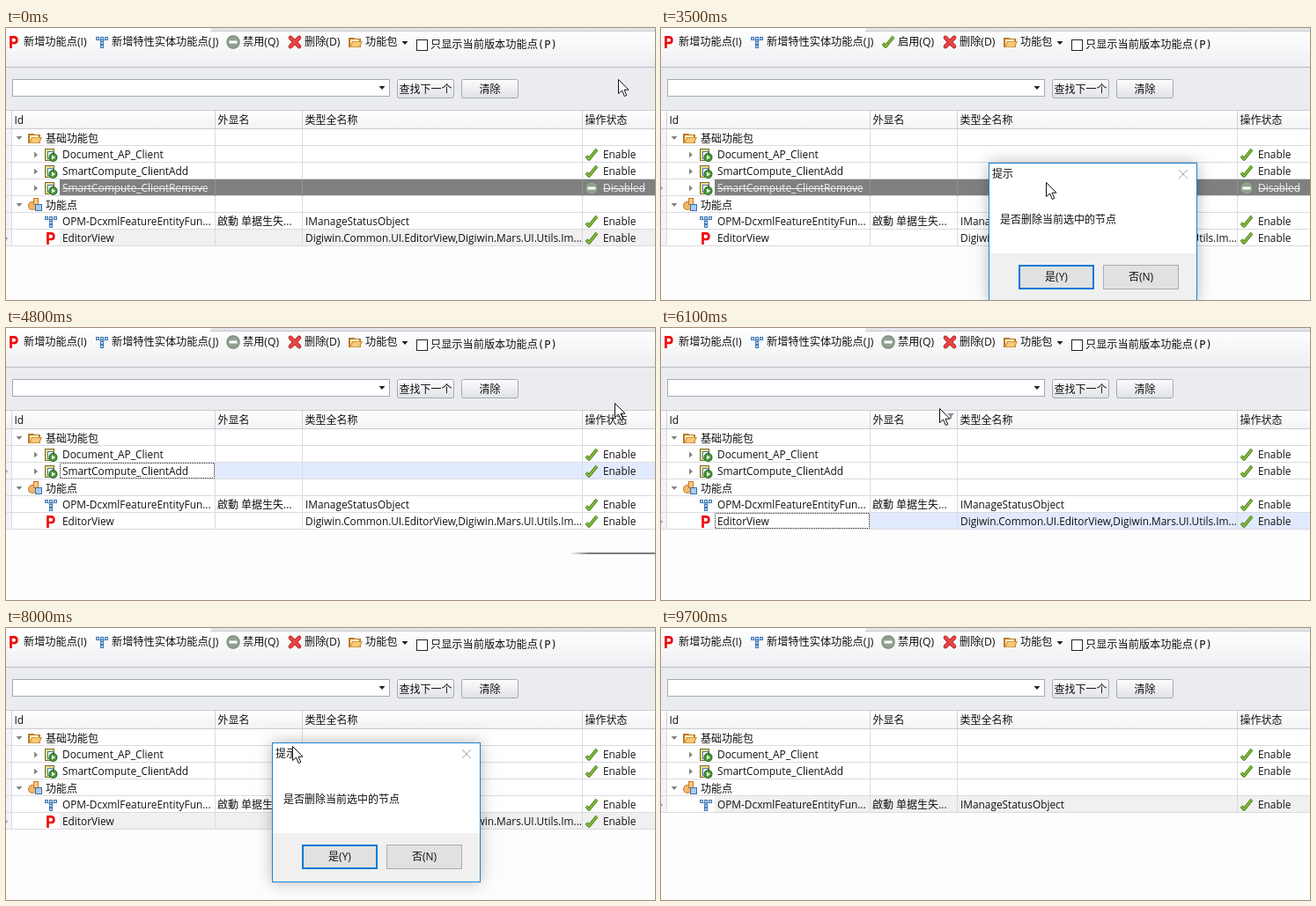
An HTML page with a canvas that plays this animation: 737 px wide and 309 px high, repeating every 9800 ms.

```html
<!DOCTYPE html>
<html lang="zh">
<head>
<meta charset="utf-8">
<style>
html, body { margin: 0; width: 100%; height: 100%; overflow: hidden; background: #fdfdfd; }
canvas { display: block; }
</style>
</head>
<body>
<canvas id="stage" width="737" height="309"></canvas>
<script>
const ctx = document.getElementById('stage').getContext('2d');
const W = 737, H = 309, LOOP = 9800, STEP = 100;
const ROW_TOP = 115, ROW_H = 19, CELL_X = 61;
const UI = '"Open Sans", "Noto Sans CJK SC", "Noto Sans CJK", sans-serif';
const CJK = '12px ' + UI;
const TOOL = '12.2px ' + UI;
const LATIN = '11.85px ' + UI;
const MONO = '12.2px "DejaVu Sans Mono", "Noto Sans CJK SC", "Noto Sans CJK", monospace';
const INK = '#111', LINE = '#dadbde', EDGE = '#a5a9b1';

// Motion: things rest at a stop, then ease out towards the next one.
const at = (x, y) => ({ x, y });
const shift = (a, b) => at(a.x + b.x, a.y + b.y);
const stop = (place, arrive, leave = arrive) => ({ place, arrive, leave });
const clamp = v => Math.max(0, Math.min(1, v));
const easeOut = u => 1 - (1 - u) ** 2;

function travel(stops, t) {
  const next = stops.findIndex(s => s.arrive > t);
  if (next === 0) return stops[0].place;
  if (next < 0) return stops[stops.length - 1].place;
  const a = stops[next - 1], b = stops[next];
  const p = easeOut(clamp((t - a.leave) / (b.arrive - a.leave)));
  const mix = key => Math.round(a.place[key] + (b.place[key] - a.place[key]) * p);
  return at(mix('x'), mix('y'));
}

const HOME = at(616, 298);
const DELETE_SPOT = at(336, 15);
const rowSpot = (x, index) => at(x, ROW_TOP + ROW_H * index + 5);

function makeDialog(open, press, close, grab, stops) {
  const yes = shift(stops[stops.length - 1].place, at(77, 127));
  const drag = stops.map(s => ({ ...s, place: shift(s.place, grab) }));
  return { open, press, close, stops, drag, yes };
}

const first = makeDialog(1800, 4200, 4400, at(65, 23), [
  stop(HOME, 2700, 3100), stop(at(290, 105), 3900)
]);
const second = makeDialog(6500, 8600, 8700, at(23, 5), [
  stop(HOME, 6800), stop(at(499, 128), 7400, 7600), stop(at(302, 130), 8000), stop(at(223, 73), 8200)
]);
const dialogs = [first, second];

const cursorStops = [
  stop(at(695, 59), 0),
  stop(rowSpot(183, 3), 500, 800),
  stop(DELETE_SPOT, 1400, 1900),
  ...first.drag,
  stop(first.yes, 4100, 4400),
  stop(at(691, 86), 4800),
  stop(rowSpot(262, 5), 5300, 5800),
  stop(at(316, 92), 6100),
  stop(DELETE_SPOT, 6300, 6500),
  ...second.drag,
  stop(second.yes, 8500, 8700),
  stop(rowSpot(717, 6), 9200)
];

function rect(x, y, w, h, color) {
  ctx.fillStyle = color;
  ctx.fillRect(x, y, w, h);
}

function frame(x, y, w, h, color, line = 1) {
  ctx.strokeStyle = color;
  ctx.lineWidth = line;
  ctx.strokeRect(x + line / 2, y + line / 2, w - line, h - line);
}

function box(x, y, w, h, fill, edge, line) {
  rect(x, y, w, h, fill);
  frame(x, y, w, h, edge, line);
}

function text(s, x, y, color = INK, font = CJK, align = 'left') {
  ctx.font = font;
  ctx.textAlign = align;
  ctx.fillStyle = color;
  ctx.fillText(s, x, y + 4);
}

function gradient(y, h, top, bottom) {
  const g = ctx.createLinearGradient(0, y, 0, y + h);
  g.addColorStop(0, top);
  g.addColorStop(1, bottom);
  return g;
}

function stroke(path, color, width) {
  ctx.strokeStyle = color;
  ctx.lineWidth = width;
  ctx.stroke(new Path2D(path));
}

function fill(path, color) {
  ctx.fillStyle = color;
  ctx.fill(new Path2D(path));
}

function disc(x, y, r, color) {
  ctx.beginPath();
  ctx.arc(x, y, r, 0, Math.PI * 2);
  ctx.fillStyle = color;
  ctx.fill();
}

function placed(x, y, paint) {
  ctx.save();
  ctx.translate(x, y);
  paint();
  ctx.restore();
}

// Icons are drawn around their centre.
const icons = {
  letter() {
    stroke('M-3.5 7V-5.7H0C4.5 -5.7 4.5 1 0 1H-3', '#f00c0c', 2.7);
  },
  entity() {
    stroke('M-5 -4L0 0L5 -4M0 -4V5', '#5283b5', 1);
    const node = (x, y) => box(x, y, 4, 4, '#b9d8f3', '#3f78b5');
    for (const x of [-7, -2, 3]) node(x, -6);
    for (const y of [-1, 3]) node(-2, y);
  },
  disable() {
    disc(0, 0, 7.7, '#70806f');
    disc(0, 0, 6.8, '#91a18f');
    rect(-4.5, -1.5, 9, 3, '#fff');
  },
  remove() {
    ctx.lineCap = 'round';
    const cross = 'M-5 -5L5 5M5 -5L-5 5';
    stroke(cross, '#a91c1c', 4.6);
    stroke(cross, '#e94444', 3.2);
  },
  folder() {
    fill('M-8 6V-5H-2L0 -4H6V6Z', '#b87a2c');
    rect(-6, -3, 10, 7, '#fff0c6');
    fill('M-7 6L-4 -1H8L5 6Z', '#d9983c');
    fill('M-5 5L-3 0H6L4 5Z', '#f5ca7a');
  },
  check() {
    ctx.lineJoin = 'round';
    stroke('M-6 1.5L-3 5L6 -6', '#4b8420', 3.6);
    stroke('M-6 1.5L-3 5L6 -6', '#8dbd3c', 1.8);
  },
  pack() {
    box(-7, -7, 11, 14, '#f2dc8c', '#77682f');
    box(-4, -4, 7, 9, '#fff', '#4880ad');
    disc(2.5, 3, 5, '#23671f');
    disc(2.5, 3, 4, '#4a983c');
    fill('M1 0.5L5 3L1 5.5Z', '#fff');
  },
  group() {
    disc(-3, 1, 5, '#c87627');
    disc(-3, 1, 4, '#f0b86b');
    box(-2, -8, 6, 8, '#f8ca7d', '#c87627');
    box(0, -1, 8, 8, '#a9cbed', '#3a6faa');
  }
};

const icon = (name, x, y) => placed(x, y, icons[name]);
const arrowDown = (x, y, color) => placed(x, y, () => fill('M-3.5 -2H3.5L0 2Z', color));
const arrowRight = (x, y, color) => placed(x, y, () => fill('M-2 -3.5L2 0L-2 3.5Z', color));

function drawToolbar(enabling, hover) {
  rect(0, 0, W, 44, gradient(0, 44, '#ffffff', '#eeeff2'));
  rect(233, 0, W, 3, '#e3e5e9');
  rect(232, 3, W, 1, '#c5c8ce');
  if (hover) box(319, 5, 67, 23, '#f1f3f7', '#c3c7cf');

  const [toggleIcon, toggleLabel] = enabling ? ['check', '启用(Q)'] : ['disable', '禁用(Q)'];
  const tools = [
    ['letter', '新增功能点(I)', 9], ['entity', '新增特性实体功能点(J)', 109],
    [toggleIcon, toggleLabel, 258], ['remove', '删除(D)', 328], ['folder', '功能包', 397]
  ];
  for (const [name, label, x] of tools) {
    icon(name, x, 16);
    text(label, x + 11, 16, INK, TOOL);
  }
  arrowDown(453, 17, '#222');
  box(466, 13, 13, 13, '#fff', '#222');
  text('只显示当前版本功能点(P)', 482, 18.5, INK, MONO);
}

function searchButton(x, label) {
  ctx.beginPath();
  ctx.roundRect(x + .5, 58.5, 64, 21, 2);
  ctx.fillStyle = gradient(58, 22, '#fdfdfe', '#dfe1e6');
  ctx.fill();
  ctx.strokeStyle = EDGE;
  ctx.lineWidth = 1;
  ctx.stroke();
  text(label, x + 32.5, 70, INK, CJK, 'center');
}

function drawSearch() {
  rect(0, 44, W, 49, '#ebecef');
  rect(0, 44, W, 1, '#b9bcc3');
  box(7, 58, 429, 20, '#fff', EDGE);
  arrowDown(427, 68, '#222');
  searchButton(444, '查找下一个');
  searchButton(517, '清除');
}

const COLUMNS = [[6, 'Id'], [237, '外显名'], [336, '类型全名称'], [654, '操作状态']];
const ROWS = {
  base: { label: '基础功能包', icon: 'folder', group: true },
  doc: { label: 'Document_AP_Client', icon: 'pack', child: true },
  add: { label: 'SmartCompute_ClientAdd', icon: 'pack', child: true },
  gone: { label: 'SmartCompute_ClientRemove', icon: 'pack', child: true, off: true },
  points: { label: '功能点', icon: 'group', group: true },
  opm: { label: 'OPM-DcxmlFeatureEntityFun...', icon: 'entity', alias: '啟動 单据生失...', type: 'IManageStatusObject' },
  editor: { label: 'EditorView', icon: 'letter', type: 'Digiwin.Common.UI.EditorView,Digiwin.Mars.UI.Utils.Im...' }
};

function drawRowBack(row, y, focus) {
  rect(0, y, W, ROW_H, '#fff');
  rect(0, y, 6, ROW_H, '#f3f4f6');
  if (row.off) rect(CELL_X, y, W, ROW_H, '#808080');
  else if (focus === 'idle') rect(CELL_X, y, W, ROW_H, '#f0f0f1');
  else if (focus) rect(237, y, W, ROW_H, '#e2eaff');
  rect(0, y + ROW_H - 1, W, 1, LINE);
  for (const [x] of COLUMNS) rect(x, y, 1, ROW_H, row.off && x > CELL_X ? '#929292' : LINE);
  if (focus === 'active' && !row.off) {
    ctx.setLineDash([1, 1]);
    ctx.lineDashOffset = .5;
    frame(CELL_X, y, 176, ROW_H - 1, '#222');
    ctx.setLineDash([]);
  }
}

function struckText(s, x, y, row) {
  const ink = row.off ? '#f1f1f1' : INK;
  text(s, x, y, ink, LATIN);
  if (row.off) rect(x, y, ctx.measureText(s).width, 1, ink);
}

function drawRow(row, y, focus) {
  const mid = y + 10;
  drawRowBack(row, y, focus);
  if (focus) placed(0, mid, () => stroke('M-2 -3L1.5 0L-2 3', '#777', 1));
  if (row.group) {
    arrowDown(15, mid, '#858585');
    icon(row.icon, 33, mid);
    text(row.label, 45, mid + 1);
    return;
  }
  if (row.child) arrowRight(34, mid, '#858585');
  icon(row.icon, 51, mid);
  struckText(row.label, 64, mid, row);
  if (row.alias) text(row.alias, 240, mid);
  if (row.type) text(row.type, 340, mid, INK, LATIN);
  icon(row.off ? 'disable' : 'check', 665, mid);
  struckText(row.off ? 'Disabled' : 'Enable', 678, mid, row);
}

function drawTable(names, focused, mode, filter) {
  rect(0, 93, W, 22, gradient(93, 22, '#ffffff', '#f1f2f4'));
  for (const y of [93, 114]) rect(0, y, W, 1, '#c9ccd1');
  for (const [x, label] of COLUMNS) {
    rect(x, 94, 1, 20, '#d0d2d7');
    text(label, x + 3.5, 105);
  }
  if (filter) placed(329, 100, () => fill('M-4 -3H4L1 0V3H-1V0Z', '#8c8f94'));
  names.forEach((name, i) => drawRow(ROWS[name], ROW_TOP + i * ROW_H, name === focused && mode));
}

function shadow(blur, offset, color) {
  ctx.shadowColor = color;
  ctx.shadowBlur = blur;
  ctx.shadowOffsetX = ctx.shadowOffsetY = offset;
}

function drawTooltip(alpha) {
  ctx.save();
  ctx.globalAlpha = alpha;
  shadow(4, 2, 'rgba(0,0,0,.45)');
  rect(334, 48, 108, 22, '#fff');
  ctx.shadowColor = 'transparent';
  frame(334, 48, 108, 22, '#a0a0a0');
  text('删除功能包功能点', 340, 58, '#666');
  ctx.restore();
}

function dialogButton(x, label, face, edge, line) {
  box(x, 116, 86, 28, face, edge, line);
  text(label, x + 43, 130, INK, CJK, 'center');
}

function drawDialog(dialog, t) {
  const { x, y } = travel(dialog.stops, t);
  placed(x, y, () => {
    ctx.globalAlpha = clamp((t - dialog.open + 100) / 300);
    shadow(16, 0, 'rgba(0,0,0,.28)');
    rect(0, 0, 237, 159, '#f0f0f0');
    ctx.shadowColor = 'transparent';
    rect(0, 0, 237, 103, '#fff');
    frame(0, 0, 237, 159, '#1883d7');
    text('提示', 4, 13);
    stroke('M216 8L226 18M226 8L216 18', '#aaa', 1);
    text('是否删除当前选中的节点', 13, 65);
    dialogButton(34, '是(Y)', t >= dialog.press ? '#cce4f7' : '#e1e1e1', '#0078d7', 2);
    dialogButton(130, '否(N)', '#e1e1e1', '#adadad', 1);
  });
}

function drawCursor({ x, y }) {
  const arrow = 'M0 0V16L4 12.5L6.8 19L9.3 18L6.5 11.7H11.5Z';
  placed(x + .5, y - .5, () => {
    fill(arrow, '#fff');
    stroke(arrow, INK, 1);
  });
}

function drawEdgeShadow() {
  const g = ctx.createLinearGradient(640, 0, 662, 0);
  g.addColorStop(0, 'rgba(110,110,110,0)');
  g.addColorStop(1, 'rgba(110,110,110,.9)');
  rect(640, 255, 97, 2, g);
}

function focusAt(t) {
  if (t < 700) return 'editor';
  if (t < first.close) return 'gone';
  if (t < 5400) return 'add';
  return t < second.close ? 'editor' : 'opm';
}

function draw(t) {
  const removed = { gone: first.close, editor: second.close };
  const names = Object.keys(ROWS).filter(name => !(t >= removed[name]));
  const focused = focusAt(t);
  const during = (from, to) => t >= from && t < to;
  const shown = dialogs.filter(d => during(d.open, d.close));
  const idle = t < 700 || t >= 9700 || shown.length > 0;
  const cursor = travel(cursorStops, t);
  const filter = cursor.y > 90 && cursor.y < 115 && cursor.x > 237 && cursor.x < 336;

  rect(0, 0, W, H, '#fdfdfd');
  drawToolbar(focused === 'gone', during(1400, 1800) || during(6300, 6500));
  drawSearch();
  drawTable(names, focused, idle ? 'idle' : 'active', filter);
  if (during(4600, 5400)) drawEdgeShadow();
  if (during(1600, 2100)) drawTooltip(clamp((2100 - t) / 400));
  shown.forEach(d => drawDialog(d, t));
  if (t < 9700) drawCursor(cursor);
}

const start = performance.now();
function tick() {
  const t = (performance.now() - start) % LOOP;
  draw(Math.floor(t / STEP) * STEP);
  requestAnimationFrame(tick);
}
tick();
</script>
</body>
</html>
```
